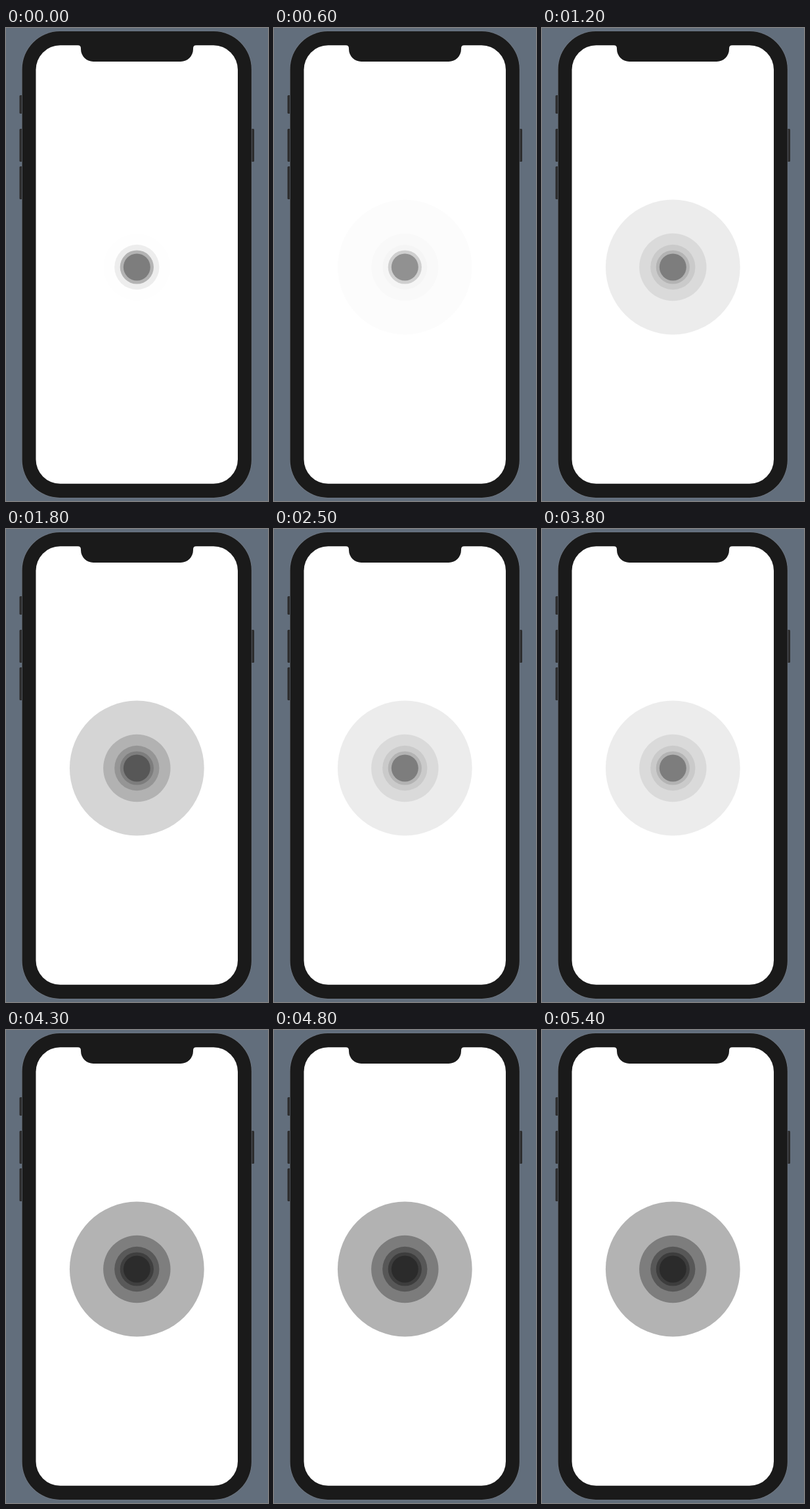
Recreate the animation shown at these times as an HTML page with a canvas. Size 399x718 px, loop 5500 ms.

```html
<!DOCTYPE html>
<html lang="en">
<head>
<meta charset="utf-8">
<title>Pulsing circles</title>
<style>
  html, body { margin: 0; width: 100%; height: 100%; overflow: hidden; background: #626e7c; }
  canvas { display: block; }
</style>
</head>
<body>
<canvas id="stage" width="399" height="718"></canvas>
<script>
const ctx = document.getElementById('stage').getContext('2d');

const LOOP = 5500, STEP = 100;
const PULSE = 650, OFFSET = 262;
const FADE_OUT = 240, FADE_IN = 200;
const CENTER = { x: 199.3, y: 363 };
const RADIUS = 102.4, ALPHA = 0.3;
// When each ring lights up again within a pulse, outermost first.
const RELIGHT = [265, 248, 202, 115];

const smooth = v => {
  const x = Math.min(1, Math.max(0, v));
  return x * x * (3 - 2 * x);
};

function box(x, y, w, h, r, color) {
  ctx.beginPath();
  ctx.roundRect(x, y, w, h, r);
  ctx.fillStyle = color;
  ctx.fill();
}

function drawNotch() {
  const left = 114, right = 285, top = 26, bottom = 51, flare = 5, r = 19;
  ctx.beginPath();
  ctx.moveTo(left - flare, top - 1);
  ctx.lineTo(left - flare, top);
  ctx.quadraticCurveTo(left, top, left, top + flare);
  ctx.arcTo(left, bottom, left + r, bottom, r);
  ctx.arcTo(right, bottom, right, bottom - r, r);
  ctx.lineTo(right, top + flare);
  ctx.quadraticCurveTo(right, top, right + flare, top);
  ctx.lineTo(right + flare, top - 1);
  ctx.closePath();
  ctx.fillStyle = '#1a1a1a';
  ctx.fill();
}

function drawPhone() {
  ctx.fillStyle = '#626e7c';
  ctx.fillRect(0, 0, 399, 718);
  for (const [x, y, h] of [[20.5, 102, 28], [20.5, 153, 50], [20.5, 210, 50], [372.5, 153, 50]]) {
    box(x, y, 5.5, h, 1.5, '#2c2c2d');
  }
  box(24, 4.5, 350.4, 709, 58, '#757c85');
  box(24.6, 5.1, 349.2, 707.8, 57.5, '#1a1a1a');
  box(45.5, 26.3, 307.5, 665.5, 37, '#fff');
  drawNotch();
}

function disc(r, alpha) {
  if (alpha <= 0) return;
  ctx.beginPath();
  ctx.arc(CENTER.x, CENTER.y, r, 0, Math.PI * 2);
  ctx.fillStyle = `rgba(0,0,0,${alpha.toFixed(4)})`;
  ctx.fill();
}

function draw(time) {
  const age = (time + OFFSET) % PULSE;
  drawPhone();
  // The fading ring and its replacement overlap for a moment.
  RELIGHT.forEach((start, i) => {
    const r = RADIUS / (i + 1);
    disc(r, ALPHA * (1 - smooth(age / FADE_OUT)));
    disc(r, ALPHA * smooth((age - start) / FADE_IN));
  });
  disc(RADIUS / 5, ALPHA);
}

const begin = performance.now();
function tick() {
  const t = (performance.now() - begin) % LOOP;
  draw(Math.floor(t / STEP) * STEP);
  requestAnimationFrame(tick);
}
tick();
</script>
</body>
</html>
```
